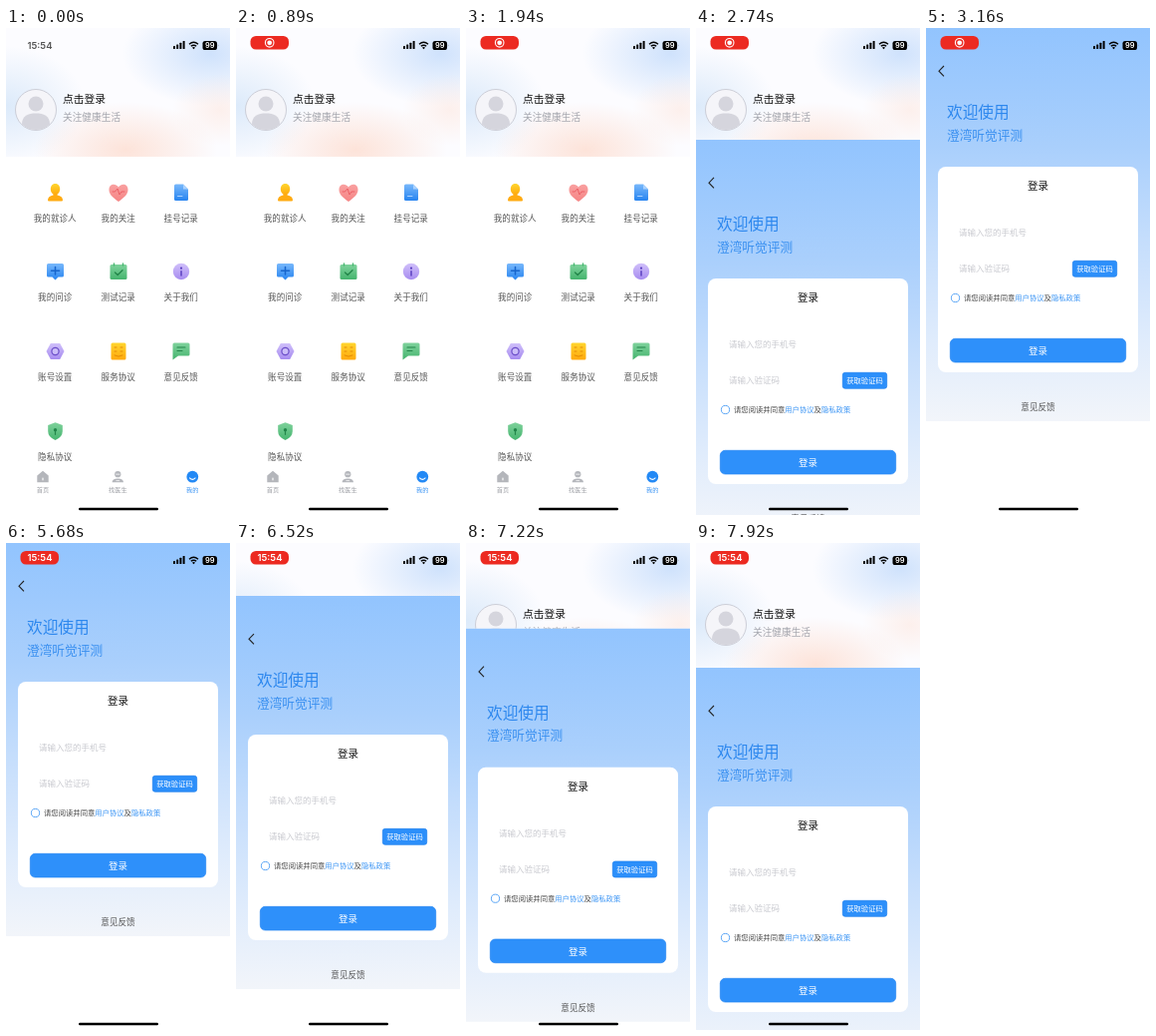
Recreate the animation shown at these times as an HTML page. Size 225 by 488 pixels, loop 8 s.

```html
<!DOCTYPE html>
<html lang="zh-CN">
<head>
<meta charset="utf-8">
<title>登录</title>
<style>
html, body { margin: 0; width: 100%; height: 100%; overflow: hidden; background: #fff; }
svg { display: block; width: 100vw; height: 100vh; }
text { font-family: "Noto Sans CJK SC", "Noto Sans CJK", "Noto Sans", sans-serif; }
.num { font-family: Inter, Roboto, sans-serif; font-weight: 600; }
</style>
</head>
<body>
<svg viewBox="0 0 225 488">
  <defs>
    <linearGradient id="sky" x2="0" y2="1">
      <stop offset="0" stop-color="#92c4fe"/>
      <stop offset=".3" stop-color="#a9cffc"/>
      <stop offset=".55" stop-color="#c6defc"/>
      <stop offset=".8" stop-color="#e0ecfc"/>
      <stop offset="1" stop-color="#f2f5fa"/>
    </linearGradient>
    <radialGradient id="blue"><stop stop-color="#cfe2fc"/><stop offset="1" stop-color="#cfe2fc" stop-opacity="0"/></radialGradient>
    <radialGradient id="pale"><stop stop-color="#dceafa"/><stop offset="1" stop-color="#dceafa" stop-opacity="0"/></radialGradient>
    <radialGradient id="peach"><stop stop-color="#fde3d9"/><stop offset="1" stop-color="#fde3d9" stop-opacity="0"/></radialGradient>
    <clipPath id="band"><path d="M0 0H225V129H0z"/></clipPath>
    <g id="tints"></g>
  </defs>

  <g id="profile">
    <path d="M0 0H225V488H0z" fill="#fff"/>
    <g clip-path="url(#band)">
      <path d="M0 0H225V129H0z" fill="#fcfcff"/>
      <ellipse cx="0" cy="78" rx="80" ry="60" fill="url(#pale)"/>
      <ellipse cx="205" cy="26" rx="88" ry="52" fill="url(#blue)"/>
      <ellipse cx="120" cy="122" rx="92" ry="48" fill="url(#peach)"/>
      <ellipse cx="215" cy="82" rx="48" ry="36" fill="url(#peach)" opacity=".5"/>
    </g>
    <circle cx="30" cy="82" r="20.5" fill="#f5f5f9" stroke="#c3c5ce" stroke-width=".8"/>
    <g fill="#d5d5dd">
      <circle cx="30" cy="76" r="7.500"/>
      <path d="M16 96.500C16 88 22 85.500 30 85.500S44 88 44 96.500Q38 102 30 102T16 96.500z"/>
    </g>
    <g id="menu"></g>
    <path d="M0 440H225V488H0z" fill="#fff"/>
    <g id="tabs"></g>
  </g>

  <g id="login">
    <path d="M0 0H225V488H0z" fill="#fff"/>
    <path d="M0 0H225V394H0z" fill="url(#sky)"/>
    <path d="M18 38l-5 5.200 5 5.200" fill="none" stroke="#222" stroke-width="1.100"/>
    <rect x="12" y="139" width="201" height="206" rx="8" fill="#fff"/>
    <rect x="147.300" y="233.300" width="44.400" height="16" rx="2.500" fill="#2c8ffa" stroke="#1c7fee" stroke-width=".7"/>
    <circle cx="29.500" cy="270.500" r="4.100" fill="#fff" stroke="#4a9cf4" stroke-width=".9"/>
    <rect x="24.300" y="311.300" width="176.400" height="23.700" rx="5" fill="#2e90fa" stroke="#2285f2" stroke-width=".7"/>
    <g id="form"></g>
  </g>

  <g id="status">
    <rect x="168" y="18" width="2" height="3" rx=".5"/>
    <rect x="171.200" y="16.500" width="2" height="4.500" rx=".5"/>
    <rect x="174.400" y="14.800" width="2" height="6.200" rx=".5"/>
    <rect x="177.600" y="13" width="2" height="8" rx=".5"/>
    <path d="M184 16.300q4.500-4 9 0M185.800 18.300q2.700-2.300 5.400 0" fill="none" stroke="#000" stroke-width="1.400"/>
    <path d="M187 19.700q1.500-1.200 3 0l-1.500 1.600z"/>
    <rect x="197.500" y="13" width="14.500" height="9" rx="2.600"/>
    <path d="M212.800 16v3q1.200-1.500 0-3" fill="#777"/>
    <text class="num" x="204.800" y="20.300" font-size="7.500" text-anchor="middle" fill="#fff">99</text>
    <rect id="pill" x="14.500" y="8" width="38.500" height="13.500" rx="5.500" fill="#ec2a21"/>
    <g id="rec" fill="#fff">
      <circle cx="33.700" cy="14.800" r="4.300" fill="none" stroke="#fff" stroke-width="1.100"/>
      <circle cx="33.700" cy="14.800" r="2.400"/>
    </g>
    <text id="clock" class="num" x="34" font-size="9.500" text-anchor="middle">15:54</text>
  </g>
  <rect x="73" y="480.700" width="80" height="2.500" rx="1.250"/>
</svg>

<script>
const $ = id => document.getElementById(id);
const LOOP = 8000;

const label = (s, x, y, size, fill, anchor = 'start', weight = 400) =>
  `<text x="${x}" y="${y}" font-size="${size}" fill="${fill}" text-anchor="${anchor}" font-weight="${weight}">${s}</text>`;
const shape = (d, fill) => `<path d="${d}" fill="${fill}"/>`;
const line = (d, color, w = 1.2) =>
  `<path d="${d}" fill="none" stroke="${color}" stroke-width="${w}" stroke-linecap="round" stroke-linejoin="round"/>`;
const dot = (x, y, r, fill) => `<circle cx="${x}" cy="${y}" r="${r}" fill="${fill}"/>`;

// Vertical two-tone fills for the icons.
const tint = {
  amber: ['#ffd52e', '#ffa90c'], rose: ['#f9a0a0', '#f58585'], azure: ['#78b8fb', '#2784f0'],
  leaf: ['#7fd29c', '#45b46e'], violet: ['#d0c0fa', '#a78cf0']
};
$('tints').innerHTML = Object.entries(tint).map(([id, [top, low]]) =>
  `<linearGradient id="${id}" x2="0" y2="1"><stop stop-color="${top}"/><stop offset="1" stop-color="${low}"/></linearGradient>`).join('');
const use = id => `url(#${id})`;

// Each icon is drawn around its own centre.
const items = [
  ['我的就诊人', shape('M-7.500 7.500Q-7.500 3.500-2 2.500V0H2V2.500Q7.500 3.500 7.500 7.500Q7.500 8.500 6.500 8.500H-6.500Q-7.500 8.500-7.500 7.500z', '#ffab12') + shape('M0-9C6.500-9 6 2 0 2S-6.500-9 0-9z', use('amber'))],
  ['我的关注', shape('M0 9C-7 4-9.500 1-9.500-3C-9.500-9-3-10 0-5.500C3-10 9.500-9 9.500-3C9.500 1 7 4 0 9z', use('rose')) + line('M-6-1h2.500l2.500-3 2 6 2-3H6', '#ea5a60', .9)],
  ['挂号记录', shape('M-5.500-8.500H2L7-3.500V6.500Q7 8 5.500 8H-5.500Q-7 8-7 6.500V-7Q-7-8.500-5.500-8.500z', use('azure')) + shape('M2-8.500L7-3.500H2z', '#a9d1fd') + line('M-3.500 3.500H1', '#a9d1fd', 1)],
  ['我的问诊', shape('M-7-8H7Q8.500-8 8.500-6.500V4Q8.500 5.500 7 5.500H3L0 8.500-3 5.500H-7Q-8.500 5.500-8.500 4V-6.500Q-8.500-8-7-8z', use('azure')) + line('M0-4.500V3M-4-.8H4', '#1765cc', 1.500)],
  ['测试记录', shape('M-7-7H7Q8.500-7 8.500-5.500V6.500Q8.500 8 7 8H-7Q-8.500 8-8.500 6.500V-5.500Q-8.500-7-7-7z', use('leaf')) + line('M-4.500-8V-6M4.500-8V-6', '#45b46e', 1.300) + line('M-3.500 1l2.700 2.500L4-1.200', '#23854a', 1.300)],
  ['关于我们', dot(0, 0, 8.200, use('violet')) + dot(0, -3.300, 1.100, '#5a3fc0') + line('M0-.3V4', '#5a3fc0', 1.500)],
  ['账号设置', shape('M-4.700-8H4.700L9 0 4.700 8H-4.700L-9 0z', use('violet')) + '<circle r="3.600" fill="#cbbdf8" stroke="#6a4cc8" stroke-width="1.200"/>'],
  ['服务协议', shape('M-6-8.500H6Q7.500-8.500 7.500-7V7Q7.500 8.500 6 8.500H-6Q-7.500 8.500-7.500 7V-7Q-7.500-8.500-6-8.500z', use('amber')) + line('M-4-4h2M2-4h2M-4 0h2M2 0h2M-4 4q4 2.500 8 0', '#e58a06', 1)],
  ['意见反馈', shape('M-7-8.500H7Q8.500-8.500 8.500-7V3Q8.500 4.500 7 4.500H-3L-8.500 8.500V-7Q-8.500-8.500-7-8.500z', use('leaf')) + line('M-4-4H4M-4-.5H1', '#23854a', 1.100)],
  ['隐私协议', shape('M0-8.800L7.300-6V0Q7.300 6 0 9Q-7.300 6-7.300 0V-6z', use('leaf')) + dot(0, -1.300, 1.700, '#23854a') + line('M0 0V3.300', '#23854a', 1.200)]
];
const cols = [49.5, 113, 176], rows = [165, 244, 324, 404];
$('menu').innerHTML =
  label('点击登录', 57, 75.2, 10.75, '#111', 'start', 500) +
  label('关注健康生活', 57, 92.5, 9.7, '#a3a5ad') +
  items.map(([name, art], i) => {
    const x = cols[i % 3], y = rows[Math.floor(i / 3)];
    return `<g transform="translate(${x} ${y})">${art}</g>` + label(name, x - 0.3, y + 28.6, 8.55, '#555', 'middle');
  }).join('');

const grey = '#b4b6bb';
const tabs = [
  ['首页', 37, '#9a9ca2', shape('M-6-1.500L0-6.500 6-1.500V5.500H-6z', grey) + line('M0 1V3', '#fff', 1.200)],
  ['找医生', 112.3, '#9a9ca2', dot(0, -3, 3.300, grey) + shape('M-6 5.500Q-6 1.500 0 1.500T6 5.500z', grey) + line('M-1.500 3.800H1.500M-1.800-3H1.800', '#fff', .8)],
  ['我的', 187.3, '#3a94f4', dot(0, -.3, 6.200, '#2389f5') + line('M-3 1Q0 4 3 1', '#fff', 1.100)]
];
$('tabs').innerHTML = tabs.map(([name, x, color, art]) =>
  `<g transform="translate(${x} 450) scale(.95)">${art}</g>` + label(name, x, 465.2, 6.2, color, 'middle')).join('');

const link = s => `<tspan fill="#3a94f4">${s}</tspan>`;
$('form').innerHTML =
  label('欢迎使用', 21, 90, 15.7, '#2c87ee', 'start', 300) +
  label('澄湾听觉评测', 21, 111.7, 12.7, '#3a90f0', 'start', 300) +
  label('登录', 112.5, 162.3, 10.5, '#111', 'middle', 500) +
  label('请输入您的手机号', 33, 208.2, 8.5, '#c8c9cf') +
  label('请输入验证码', 33, 244.2, 8.5, '#c8c9cf') +
  label('获取验证码', 169.5, 243.9, 7.3, '#fff', 'middle') +
  label(`请您阅读并同意${link('用户协议')}及${link('隐私政策')}`, 38, 273.2, 7.33, '#444') +
  label('登录', 112.5, 326.8, 9.5, '#fff', 'middle', 500) +
  label('意见反馈', 112.5, 383.2, 8.6, '#555', 'middle');

// Sheet position while it is pulled down: [ms, y].
const drag = [[5940, 0], [6520, 53], [6660, 57], [7500, 100], [7920, 125]];

function sheetY(t) {
  if (t < drag[0][0]) {
    const p = Math.min(1, Math.max(0, (t - 2551) / 490));
    return 488 * (1 - p) ** 3;
  }
  const i = drag.findIndex(([ms]) => t < ms);
  if (i < 0) return 125;
  const [t0, y0] = drag[i - 1], [t1, y1] = drag[i];
  return y0 + (y1 - y0) * (t - t0) / (t1 - t0);
}

const show = (id, on) => $(id).setAttribute('visibility', on ? 'visible' : 'hidden');

function draw(t) {
  const recording = t >= 500, icon = recording && t < 4600;
  $('login').setAttribute('transform', `translate(0 ${sheetY(t).toFixed(2)})`);
  show('pill', recording);
  show('rec', icon);
  show('clock', !icon);
  $('clock').setAttribute('fill', recording ? '#fff' : '#555');
  $('clock').setAttribute('y', recording ? 18.2 : 20.8);
}

const start = performance.now();
function tick() {
  draw((performance.now() - start) % LOOP);
  requestAnimationFrame(tick);
}
tick();
</script>
</body>
</html>
```
